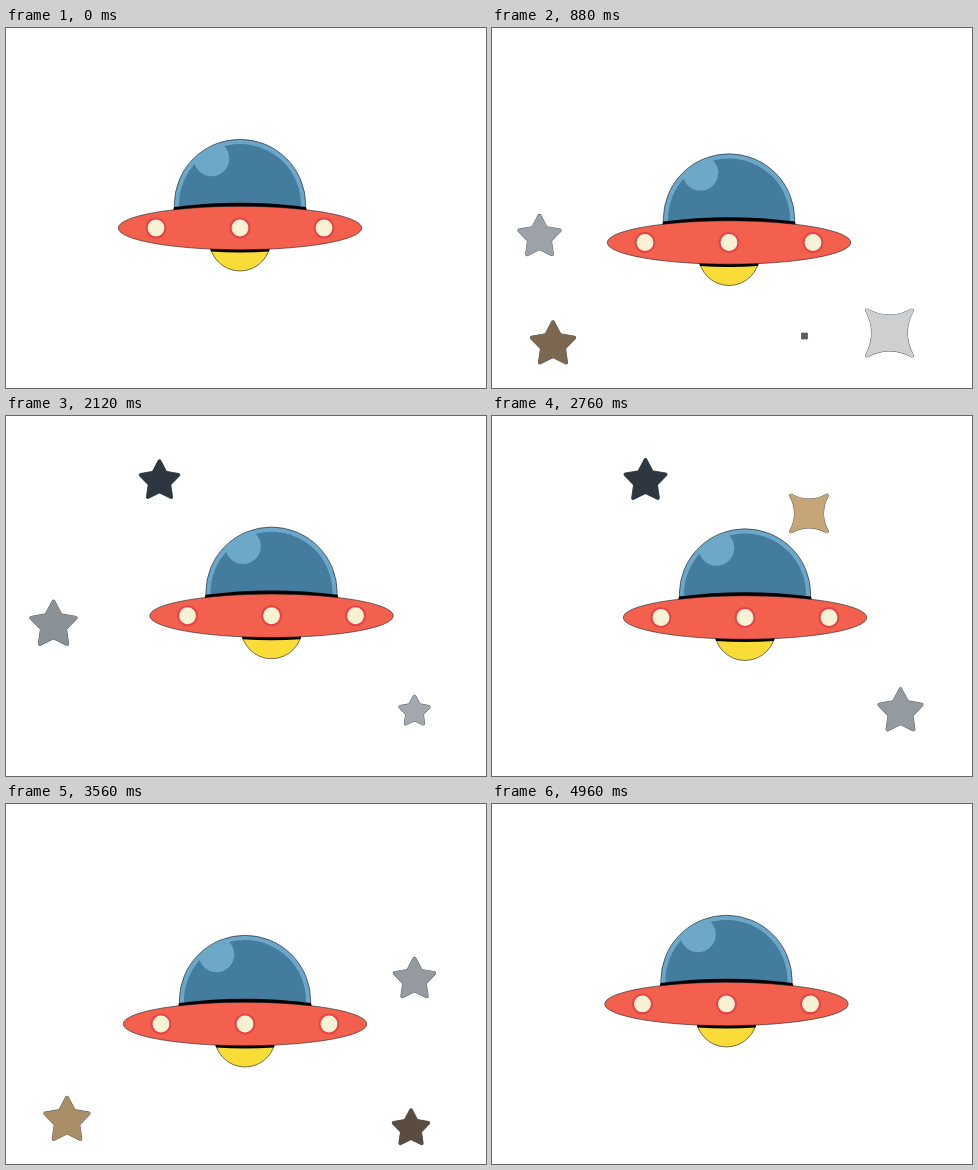
An HTML page with a canvas that plays this animation: 480 px wide and 360 px high, repeating every 5000 ms.

```html
<!DOCTYPE html>
<html>
<head>
<meta charset="utf-8">
<style>
  html, body { margin: 0; width: 100%; height: 100%; overflow: hidden; background: #fff; }
  canvas { display: block; }
</style>
</head>
<body>
<canvas width="480" height="360"></canvas>
<script>
const ctx = document.querySelector('canvas').getContext('2d');
const LOOP = 5000, STEP = 40, TAU = Math.PI * 2;
const EDGE = 'rgba(25,30,35,.75)';
const lerp = (a, b, p) => a + (b - a) * p;

const tan = [198, 166, 120], brown = [96, 82, 66], umber = [72, 60, 54];
const white = [206, 207, 209], silver = [166, 172, 177], grey = [138, 145, 150];
const slate = [86, 92, 98], navy = [46, 55, 64];

// Each star is shown between two times while its colour fades
const star = (points, x, y, birth, death, from, to, size = 25) =>
  ({ points, x, y, birth, death, from, to, size });

const stars = [
  star(5, 47.5, 209, 150, 2160, silver, grey),
  star(5, 61, 316.5, 400, 1560, umber, tan, 26),
  star(4, 397.5, 305, 250, 1110, white, white),
  star(4, 312.5, 308, 200, 885, silver, slate),
  star(5, 153.5, 65, 1250, 2800, navy, navy, 22.7),
  star(5, 408.5, 295.5, 2000, 3200, silver, grey),
  star(4, 317, 97.5, 2450, 3440, tan, tan, 21.5),
  star(5, 408.5, 175.5, 3300, 4430, silver, slate),
  star(5, 405, 324.5, 3200, 4560, brown, umber, 22),
  star(5, 61, 316.5, 3300, 4200, tan, brown, 27),
  star(4, 37, 196.5, 3640, 4430, white, grey)
];

// Key points of the flight: time, x, y
const flight = [
  [0, 234, 200], [880, 237, 214.5], [1440, 271, 203],
  [2760, 253, 201.5], [3560, 239, 220], [4360, 250.5, 209.5]
];

function flightPoint(i) {
  const n = flight.length, lap = Math.floor(i / n);
  const [t, x, y] = flight[i - lap * n];
  return [t + lap * LOOP, x, y];
}

// Smooth periodic curve through the key points
function saucerAt(t) {
  const i = flight.findLastIndex(key => key[0] <= t);
  const [a, b, c, d] = [-1, 0, 1, 2].map(k => flightPoint(i + k));
  const span = c[0] - b[0], u = (t - b[0]) / span;
  return [1, 2].map(k => {
    const m0 = (c[k] - a[k]) / (c[0] - a[0]) * span;
    const m1 = (d[k] - b[k]) / (d[0] - b[0]) * span;
    return b[k] + u * (m0 + u * (3 * (c[k] - b[k]) - 2 * m0 - m1
      + u * (2 * (b[k] - c[k]) + m0 + m1)));
  });
}

function starPath(points, r) {
  ctx.beginPath();
  if (points === 5) {
    for (let i = 0; i < 10; i++) {
      const a = i * TAU / 10, q = i % 2 ? r * .52 : r;
      ctx.lineTo(q * Math.sin(a), -q * Math.cos(a));
    }
  } else {
    ctx.moveTo(-r, -r);
    for (let i = 0; i < 4; i++) {
      const a = i * TAU / 4, s = Math.sin(a), c = Math.cos(a), k = r * .46;
      ctx.quadraticCurveTo(k * s, -k * c, r * (c + s), r * (s - c));
    }
  }
  ctx.closePath();
}

function drawStar({ points, x, y, birth, death, from, to, size }, t) {
  if (t <= birth || t >= death) return;
  const p = (t - birth) / (death - birth);
  const pop = Math.min(1, (t - birth) / 160, (death - t) / 40);
  const r = size * lerp(.86, 1, p) * pop, round = Math.min(3, r);
  ctx.save();
  ctx.translate(x, y);
  ctx.lineJoin = 'round';
  starPath(points, r - round / 2);
  ctx.strokeStyle = EDGE;
  ctx.lineWidth = round + .8;
  ctx.stroke();
  ctx.fillStyle = ctx.strokeStyle = `rgb(${from.map((v, i) => Math.round(lerp(v, to[i], p)))})`;
  ctx.lineWidth = round;
  ctx.fill();
  ctx.stroke();
  ctx.restore();
}

function oval(x, y, rx, ry, fill, edge) {
  ctx.beginPath();
  ctx.ellipse(x, y, rx, ry, 0, 0, TAU);
  ctx.fillStyle = fill;
  ctx.fill();
  if (edge) {
    ctx.strokeStyle = EDGE;
    ctx.lineWidth = .8;
    ctx.stroke();
  }
}

// Black band with a curved edge from one side to the other
function band(half, base, side, bend) {
  ctx.fillStyle = '#000';
  ctx.beginPath();
  ctx.moveTo(-half - 1, base);
  ctx.lineTo(-half, side);
  ctx.quadraticCurveTo(0, bend, half, side);
  ctx.lineTo(half + 1, base);
  ctx.fill();
}

function drawSaucer(x, y) {
  ctx.save();
  ctx.translate(x, y);

  // Lamp underneath
  oval(0, 12.5, 30.5, 30.5, '#f9dc38', true);
  band(29, 19, 23.5, 25.5);

  // Dome
  ctx.save();
  ctx.beginPath();
  ctx.rect(-70, -95, 140, 77);
  ctx.clip();
  oval(0, -23, 65.7, 65.7, '#6ca6c8', true);
  oval(0, -23, 61, 61, '#437c9c');
  ctx.beginPath();
  ctx.arc(0, -23, 65, 0, TAU);
  ctx.clip();
  oval(-28.5, -69.5, 17.8, 17.8, '#6ea8c8');
  ctx.restore();
  band(66, -17, -21, -29.5);

  // Hull and its lights
  oval(0, 0, 121.7, 21.7, '#f3604d', true);
  for (const dx of [-84, 0, 84]) {
    oval(dx, 0, 10.5, 10.5, '#e2444a');
    oval(dx, 0, 8.4, 8.4, '#f7f2d3');
  }
  ctx.restore();
}

function draw() {
  const t = Math.floor(performance.now() % LOOP / STEP) * STEP;
  ctx.fillStyle = '#fff';
  ctx.fillRect(0, 0, 480, 360);
  stars.forEach(s => drawStar(s, t));
  drawSaucer(...saucerAt(t));
  requestAnimationFrame(draw);
}
draw();
</script>
</body>
</html>
```
